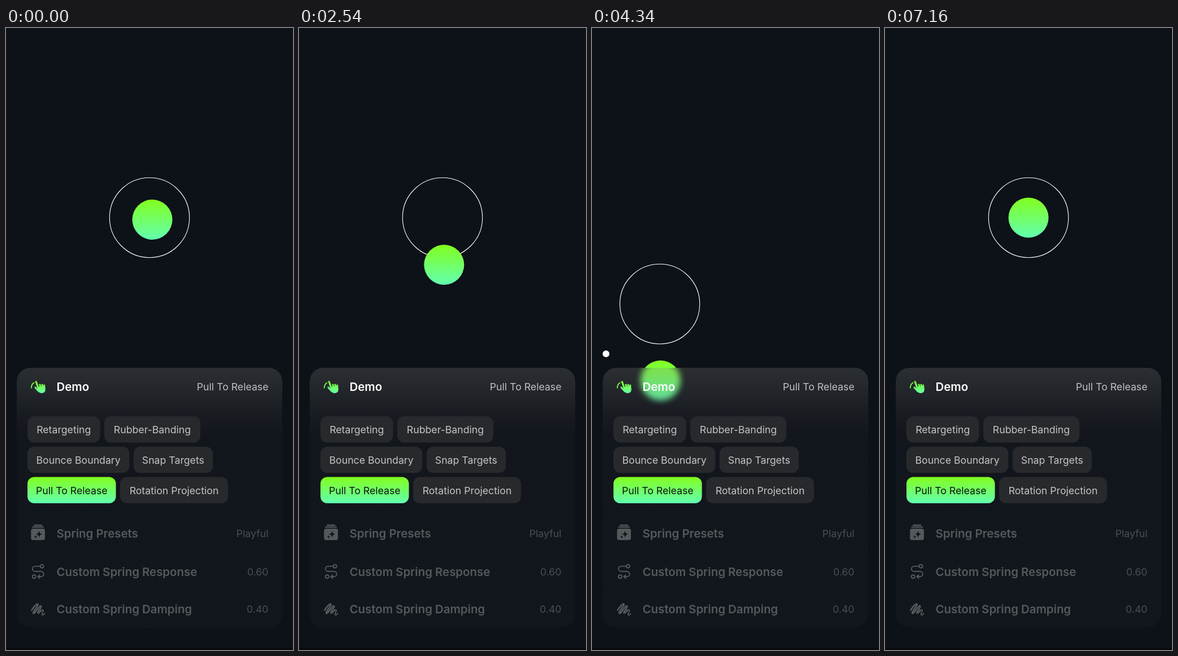
Animation, 508 px wide and 1102 px high, one loop 7.59 s. Source, as an HTML page:

```html
<!DOCTYPE html>
<html lang="en">
<head>
<meta charset="utf-8">
<title>Pull To Release</title>
<style>
  html, body { margin: 0; width: 100%; height: 100%; overflow: hidden; background: #0d1118; }
  svg { display: block; width: 508px; height: 1102px; }
  text { font: 17.7px Inter, "Liberation Sans", sans-serif; }
  .title { font-size: 20.4px; font-weight: 600; }
  .line { fill: none; stroke: #56595c; stroke-width: 2.2; stroke-linecap: round; stroke-linejoin: round; }
</style>
</head>
<body>
<svg viewBox="0 0 508 1102">
  <defs>
    <linearGradient id="green" x2="0" y2="1">
      <stop stop-color="#82ff1e"/><stop offset="1" stop-color="#62ffb0"/>
    </linearGradient>
    <linearGradient id="hand" gradientUnits="userSpaceOnUse" x1="0" y1="625" x2="0" y2="648">
      <stop stop-color="#82ff1e"/><stop offset="1" stop-color="#62ffb0"/>
    </linearGradient>
    <linearGradient id="sheen" x2="0" y2="1">
      <stop stop-color="#ffffe6" stop-opacity=".125"/>
      <stop offset=".08" stop-color="#ffffe6" stop-opacity=".093"/>
      <stop offset=".17" stop-color="#ffffe6" stop-opacity=".05"/>
      <stop offset=".26" stop-color="#ffffe6" stop-opacity=".022"/>
      <stop offset="1" stop-color="#ffffe6" stop-opacity=".022"/>
    </linearGradient>
    <filter id="blur" filterUnits="userSpaceOnUse" x="0" y="0" width="508" height="1102" color-interpolation-filters="sRGB">
      <feGaussianBlur stdDeviation="5.5"/>
    </filter>
    <clipPath id="panel"><rect x="19" y="602" width="470" height="460" rx="24"/></clipPath>
  </defs>

  <rect width="508" height="1102" fill="#0d1118"/>
  <rect y="1098" width="508" height="4" fill="#090b0f"/>
  <g id="scene">
    <circle id="ring" r="70.7" fill="none" stroke="#fff" stroke-width="1.1"/>
    <circle id="ball" r="35.5" fill="url(#green)"/>
  </g>
  <circle id="dot" cx="24.8" cy="577.3" r="6" fill="#fff"/>

  <g clip-path="url(#panel)">
    <rect y="600" width="508" height="470" fill="#0d1118"/>
    <use href="#scene" filter="url(#blur)" opacity=".86"/>
    <rect x="19" y="602" width="470" height="460" fill="url(#sheen)"/>
  </g>

  <g fill="none" stroke="url(#hand)" stroke-linecap="round" stroke-linejoin="round">
    <path d="M44.8 637.5Q44.8 631.5 49.5 628.5" stroke-width="1.8"/>
    <path d="M53.2 626.8L57 637.5L59.5 642M52 637L58 643.5" stroke-width="3.2"/>
    <path d="M60 632L61 637M64 632L64.5 637M67.7 633L67.7 638" stroke-width="3"/>
    <path d="M58 637L67.5 636Q69 641 67 644Q63 647 58.5 643.5Z" stroke-width="3.2" fill="url(#hand)"/>
  </g>

  <rect x="44.3" y="887" width="24.6" height="20.2" rx="3.6" fill="#56595c"/>
  <path class="line" d="M47.3 884.2H66M50 880.9H63.3" stroke-width="1.8"/>
  <path fill="#14171a" d="M58.5 890.5Q59.2 896 64 896.8Q59.2 897.6 58.5 903Q57.8 897.6 53 896.8Q57.8 896 58.5 890.5ZM52.5 898.5Q52.9 901.1 55.3 901.5Q52.9 901.9 52.5 904.5Q52.1 901.9 49.7 901.5Q52.1 901.1 52.5 898.5Z"/>

  <g class="line" style="stroke-width:1.9">
    <circle cx="63.6" cy="953.6" r="3"/>
    <circle cx="49.8" cy="972" r="3"/>
    <path d="M60 953.6H51.5A4.6 4.6 0 0 0 51.5 962.8H62A4.6 4.6 0 0 1 62 972H56.5M59.5 969L56.3 972L59.5 975"/>
  </g>

  <path class="line" style="stroke-width:2.7" d="M45.3 1031.5C49 1026 54 1019.5 56.3 1020.5C58.5 1022 46 1035.5 48.5 1037C51 1038.5 59 1022.5 62 1024C64.5 1026 54.5 1035 56.5 1036.5C58 1037.5 60.5 1034 62.5 1032"/>
  <path class="line" style="stroke-width:1.9" d="M62.5 1032C65 1029.5 67 1031 65.5 1034C64 1037 62.5 1040 65 1040C66.5 1040 67.5 1038.5 68.5 1037.5"/>

  <g id="labels"></g>
</svg>
<script>
const LOOP = 7590, PULLED = 2903, BALL_FREED = 4335, RING_FREED = 4355, DOT_OFF = 7160;
const HOME = [254, 336], GRIP = [259, 631];
const $ = id => document.getElementById(id);
const ring = $('ring'), ball = $('ball'), dot = $('dot'), labels = $('labels');

function add(tag, attrs, content = '') {
  const el = document.createElementNS('http://www.w3.org/2000/svg', tag);
  for (const name in attrs) el.setAttribute(name, attrs[name]);
  el.textContent = content;
  labels.append(el);
}

function row(title, value, y, titleFill, valueFill) {
  add('text', { class: 'title', x: 89.5, y, fill: titleFill }, title);
  add('text', { x: 464.5, y: y - 1, fill: valueFill, 'text-anchor': 'end' }, value);
}

function chip(label, x, y, width, active) {
  add('rect', { x, y, width, height: 46.4, rx: 12, fill: active ? 'url(#green)' : '#27292d' });
  add('text', { x: x + width / 2, y: y + 30, fill: active ? '#0b1410' : '#c4c5c7', 'text-anchor': 'middle' }, label);
}

row('Demo', 'Pull To Release', 643.3, '#fff', '#bfc1c2');
row('Spring Presets', 'Playful', 902.8, '#56595c', '#4b4e51');
row('Custom Spring Response', '0.60', 970.6, '#56595c', '#4b4e51');
row('Custom Spring Damping', '0.40', 1036.8, '#56595c', '#4b4e51');
chip('Retargeting', 38, 688, 128.5);
chip('Rubber-Banding', 174, 688, 170);
chip('Bounce Boundary', 38, 741.8, 180.3);
chip('Snap Targets', 225.7, 741.8, 140.3);
chip('Pull To Release', 38, 795.5, 156.5, true);
chip('Rotation Projection', 202, 795.5, 191);

// Damped spring, response 0.60 s and damping 0.40
function spring(from, to, ms) {
  const s = Math.max(0, ms) / 1000, omega = 2 * Math.PI / 0.6, zeta = 0.4;
  const root = Math.sqrt(1 - zeta * zeta), angle = omega * root * s;
  const left = Math.exp(-zeta * omega * s) * (Math.cos(angle) + zeta / root * Math.sin(angle));
  return to.map((end, i) => end + (from[i] - end) * left);
}

// Monotone cubic through [time, x, y] points
function follow(keys, t) {
  const last = keys.length - 1;
  if (t <= keys[0][0]) return keys[0].slice(1);
  if (t >= keys[last][0]) return keys[last].slice(1);
  const k = keys.findIndex(key => key[0] > t) - 1;
  const span = keys[k + 1][0] - keys[k][0], u = (t - keys[k][0]) / span;
  return [1, 2].map(axis => {
    const slope = i => (keys[i + 1][axis] - keys[i][axis]) / (keys[i + 1][0] - keys[i][0]);
    const tangent = i => {
      if (i === 0 || i === last) return 0;
      const a = slope(i - 1), b = slope(i);
      return a * b > 0 ? 2 * a * b / (a + b) : 0;
    };
    const p = keys[k][axis], q = keys[k + 1][axis];
    return p + (q - p) * u * u * (3 - 2 * u)
      + span * u * (1 - u) * (tangent(k) * (1 - u) - tangent(k + 1) * u);
  });
}

const tug = [[20, 259, 339.5], [120, 275, 340], [340, 275, 340], [700, 264, 350], [1080, 255, 367],
  [1540, 254.5, 391.5], [1840, 255, 403], [2600, 257, 421], [PULLED, 258.5, 430]];
const ballDrag = [[3400, 259, 640], [3640, 318, 600], [3880, 269, 591.5], [4140, 225, 600], [BALL_FREED, 121, 625]];
const ringDrag = [[3400, 259, 644], [3700, 328, 596], [3880, 299, 584], [4140, 252, 588], [4340, 120, 489]];

function ballAt(t) {
  if (t < PULLED) return follow(tug, t);
  if (t < 3400) return spring([258.5, 430], GRIP, t - PULLED);
  if (t < BALL_FREED) return follow(ballDrag, t);
  return spring([121, 625], HOME, t - BALL_FREED);
}

function ringAt(t) {
  if (t < 3400) return spring(HOME, GRIP, t - PULLED);
  if (t < RING_FREED) return follow(ringDrag, t);
  return spring([120, 489], HOME, t - RING_FREED);
}

function place(circle, [x, y]) {
  circle.setAttribute('cx', x.toFixed(2));
  circle.setAttribute('cy', y.toFixed(2));
}

const start = performance.now();
function draw() {
  const t = (performance.now() - start) % LOOP;
  place(ball, ballAt(t));
  place(ring, ringAt(t));
  dot.setAttribute('visibility', t >= PULLED && t < DOT_OFF ? 'visible' : 'hidden');
  requestAnimationFrame(draw);
}
draw();
</script>
</body>
</html>
```
